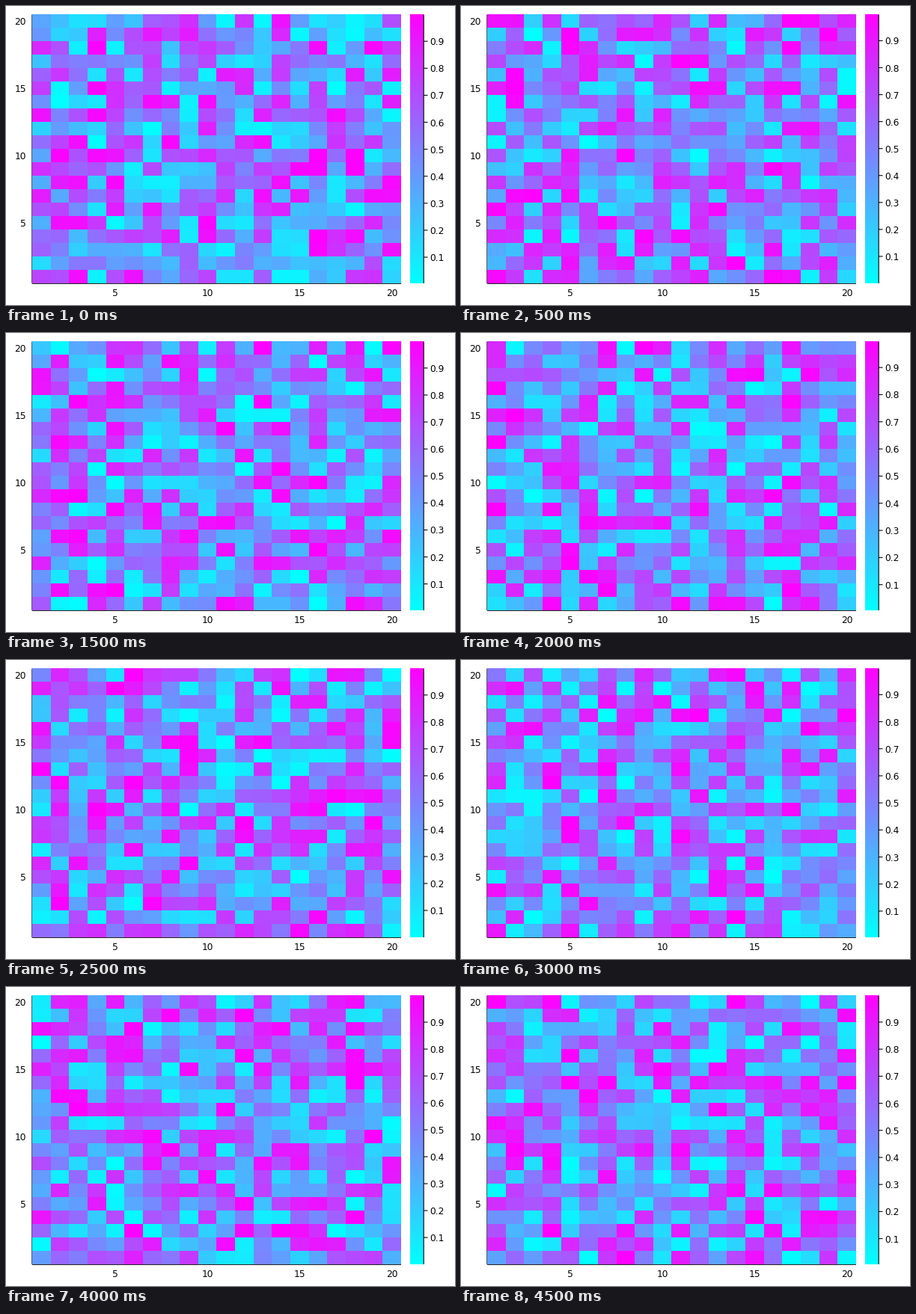
Write a matplotlib script that moves like this. It is 600 px wide and 400 px high and loops after 5 s.

```python
import numpy as np
import matplotlib.pyplot as plt
from matplotlib.animation import FuncAnimation

W, H, DPI = 600, 400, 100
N, FRAMES, STEP = 20, 10, 500
LEFT, RIGHT, TOP, BOTTOM = 35, 528, 11.5, 371
BAR_L, BAR_R = 540, 558
SIZE = 12.3 * 72 / DPI

plt.rcParams["font.family"] = "DejaVu Sans"
fig = plt.figure(figsize=(W / DPI, H / DPI), dpi=DPI, facecolor="white")
ax = fig.add_axes([0, 0, 1, 1])


def line(xs, ys, z=2):
    return ax.plot(xs, ys, color="black", lw=1.1 * 72 / DPI, zorder=z,
                   solid_capstyle="butt", snap=False)[0]


def label(x, y, text, ha):
    return ax.text(x, y, text, size=SIZE, ha=ha, va="center_baseline")


def raster(z, left, right):
    return ax.imshow(z, cmap="cool", origin="lower", aspect="auto",
                     interpolation="nearest", zorder=1,
                     extent=(left, right, BOTTOM, 11))


def field(i):
    return np.random.default_rng(40 + i).random((N, N))


def bar_y(v, lo, hi):
    return BOTTOM - (v - lo) / (hi - lo) * (BOTTOM - TOP)


cells = raster(field(0), LEFT, RIGHT)
raster(np.linspace(0, 1, 256)[:, None], BAR_L, BAR_R)
ax.set_xlim(0, W)
ax.set_ylim(H, 0)
ax.axis("off")

# The cells cover the inner half of both axis lines.
line([LEFT, RIGHT], [BOTTOM + 0.3] * 2, 0)
line([LEFT - 0.1] * 2, [TOP, BOTTOM], 0)
line([BAR_R + 0.2] * 2, [TOP, BOTTOM])

for k in (5, 10, 15, 20):
    label(LEFT + (k - 0.5) * (RIGHT - LEFT) / N, 383, str(k), "center")
    label(27, BOTTOM - (k - 0.5) * (BOTTOM - TOP) / N, str(k), "right")

levels = [k / 10 for k in range(1, 10)]
ticks = [line([BAR_R, 563.5], [0, 0]) for _ in levels]
names = [label(566, 0, f"{v:.1f}", "left") for v in levels]


def draw(i):
    z = field(i)
    lo, hi = z.min(), z.max()
    cells.set_data(z)
    cells.set_clim(lo, hi)
    for v, tick, name in zip(levels, ticks, names):
        y = bar_y(v, lo, hi)
        tick.set_ydata([y, y])
        name.set_y(y)
    return [cells, *ticks, *names]


anim = FuncAnimation(fig, draw, frames=FRAMES, interval=STEP,
                     init_func=lambda: draw(0), repeat=True, repeat_delay=0)
plt.show()
```
